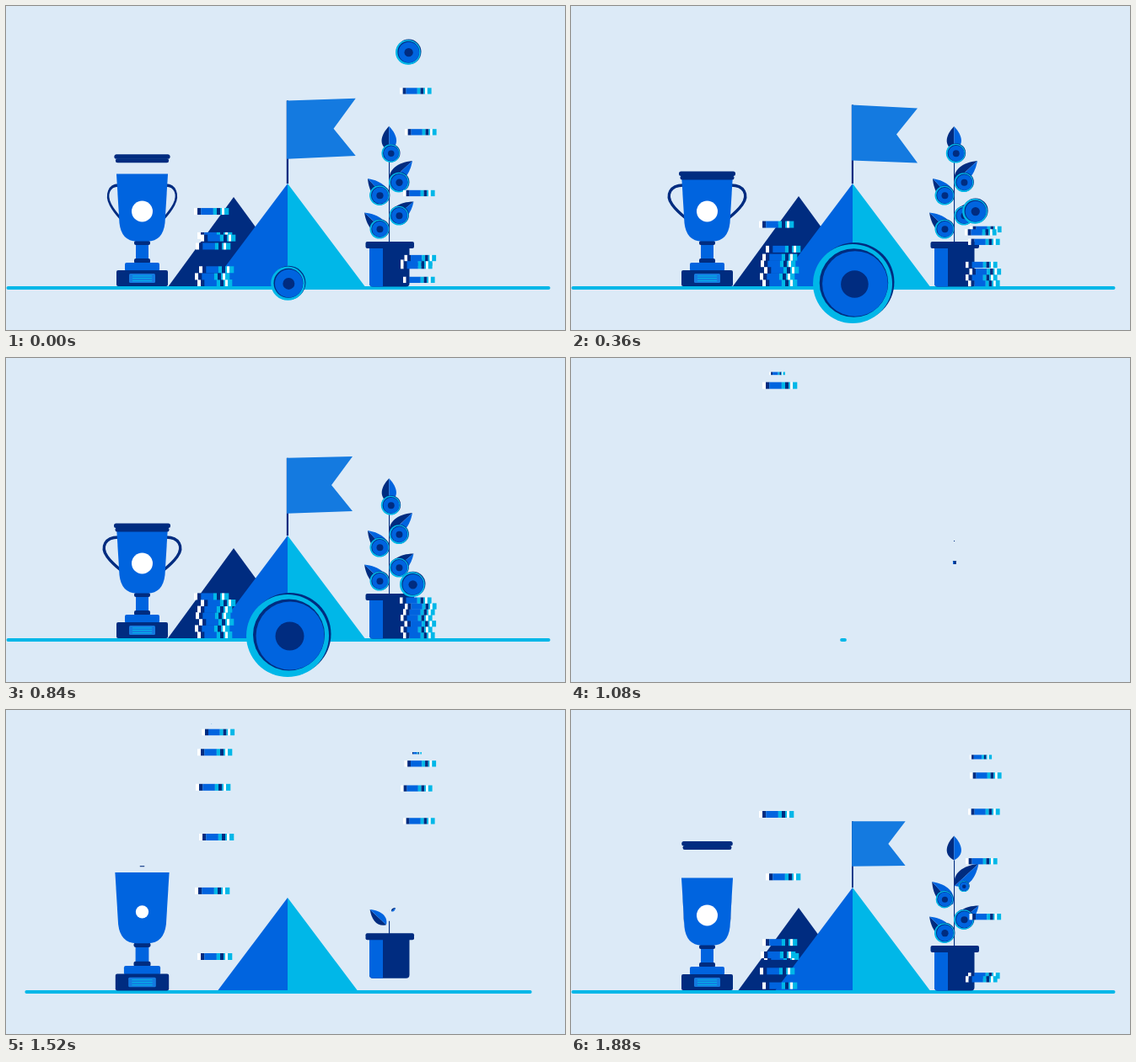
Recreate the animation shown at these times as an HTML page with a canvas. Size 663 px wide and 385 px high, loop 1920 ms.

```html
<!DOCTYPE html>
<html lang="en">
<head>
<meta charset="utf-8">
<title>Goals and savings</title>
<style>
html, body { margin: 0; width: 100%; height: 100%; overflow: hidden; background: #dceaf7; }
canvas { display: block; }
</style>
</head>
<body>
<canvas id="stage" width="663" height="385"></canvas>
<script>
const ctx = document.getElementById('stage').getContext('2d');
const BG = '#dceaf7', BLUE = '#0064df', NAVY = '#002c80', CYAN = '#00b7e8', SKY = '#147ae0', WHITE = '#fff';
const LOOP = 1920, CUT = 1060, RESUME = 2045, GRAVITY = 0.000815;

const clamp = x => Math.min(1, Math.max(0, x));
const easeOut = (v, start, span) => 1 - (1 - clamp((v - start) / span)) ** 3;
function pop(v, start, span = 400) {
  if (v <= start) return 0;
  const x = clamp((v - start) / span) - 1;
  return Math.max(0, 1 + 2.2 * x ** 3 + 1.2 * x * x);
}

// Height of something that falls from y0 to y1 and bounces twice.
function drop(v, start, y0, y1, kick) {
  let t = Math.max(0, v - start);
  const fall = Math.sqrt((y1 - y0) / GRAVITY);
  if (t < fall) return y0 + GRAVITY * t * t;
  t -= fall;
  for (let i = 0; i < 2; i++, kick *= 0.3) {
    const air = kick / GRAVITY;
    if (t < air) return y1 - kick * t + GRAVITY * t * t;
    t -= air;
  }
  return y1;
}

function rect(color, x, y, w, h, r = 0) {
  ctx.fillStyle = color;
  ctx.beginPath();
  ctx.roundRect(x, y, w, h, r);
  ctx.fill();
}
function disc(color, x, y, r) {
  ctx.fillStyle = color;
  ctx.beginPath();
  ctx.arc(x, y, r, 0, 7);
  ctx.fill();
}
function poly(color, ...pts) {
  ctx.fillStyle = color;
  ctx.beginPath();
  for (let i = 0; i < pts.length; i += 2) ctx.lineTo(pts[i], pts[i + 1]);
  ctx.fill();
}
function shape(color, d) {
  ctx.fillStyle = color;
  ctx.fill(new Path2D(d));
}
// Draws with a scale around the point (x, y).
function scaled(x, y, sx, sy, draw) {
  if (sx <= 0 || sy <= 0) return;
  ctx.save();
  ctx.translate(x, y);
  ctx.scale(sx, sy);
  ctx.translate(-x, -y);
  draw();
  ctx.restore();
}

function coin(x, y, r) {
  if (r <= 0) return;
  const k = r / 49.5;
  disc(NAVY, x + 2 * k, y - 1.5 * k, 49 * k);
  disc(CYAN, x - 0.5 * k, y + 0.5 * k, 49 * k);
  disc(NAVY, x + k, y - 0.5 * k, 42.5 * k);
  disc(BLUE, x + 2.5 * k, y + 0.5 * k, 40.5 * k);
  disc(NAVY, x + 2 * k, y + k, 17 * k);
}

const STRIPES = [[WHITE, 4], [NAVY, 4.3], [BLUE, 14.5], [CYAN, 4.2], [NAVY, 4], [CYAN, 2], [WHITE, 3], [CYAN, 5.2]];
function chip(x, y, w, h) {
  const k = w / 41.2;
  for (const [color, span] of STRIPES) {
    rect(color, x, y - h / 2, span * k + 0.1, h);
    x += span * k;
  }
}
function chips(v, pile) {
  pile.starts.forEach((start, i) => {
    const y = drop(v, start, pile.top, pile.base - i * pile.step, 0.225 + 0.018 * i);
    const s = clamp((v - start) / 120), x = pile.xs[i];
    scaled(x + pile.w / 2, y, s, s, () => chip(x, y, pile.w, pile.h));
  });
}
const LEFT = {
  xs: [227, 224, 229, 225, 227, 231, 223], starts: [937, 1026, 1113, 1215, 1315, 1407, 1516],
  top: 16, base: 329, step: 7.6, w: 41.2, h: 8
};
const RIGHT = {
  xs: [471, 468, 472.5, 468, 471, 473, 467], starts: [1203, 1290, 1390, 1481, 1585, 1695, 1795],
  top: 50, base: 329.5, step: 6.9, w: 37.5, h: 7.3
};

function mountains(v) {
  const back = easeOut(v, 1480, 711), front = easeOut(v, 1136, 712);
  scaled(270, 333, back, back, () => poly(NAVY, 192, 333, 270, 226, 348, 333));
  scaled(334, 333, front, front, () => {
    poly(BLUE, 242.5, 333, 334, 211, 334, 333);
    poly(CYAN, 334, 333, 334, 211, 425.5, 333);
  });
}

function flag(v) {
  const phase = (v - RESUME) / 760 * 2 * Math.PI;
  const y = 117 + 3 * Math.sin(phase), end = y + 0.8 - 3.3 * Math.cos(phase);
  const s = pop(v, 1765);
  scaled(334, 211, s, s, () => {
    rect(NAVY, 332.8, y, 2.2, 211 - y);
    poly(SKY, 333, y, 411, end, 386, (y + end) / 2 + 33, 411, end + 65, 333, y + 66);
  });
}

function handle() {
  ctx.strokeStyle = NAVY;
  ctx.lineWidth = 3.4;
  ctx.stroke(new Path2D('M135 213C117 212 112 225 120 236Q125 243 136 252'));
}

function trophy(v) {
  const base = pop(v, 1180, 450), cup = pop(v, 1240, 450), arms = easeOut(v, 1870, 500);
  const mark = pop(v, 1450), lid = easeOut(v, 1500, 700);
  scaled(134, 230, arms, 1, handle);
  scaled(161.5, 0, -1 + 2 * (arms > 0), 1, () => {
    ctx.translate(323, 0);
    ctx.scale(-1, 1);
    scaled(134, 230, arms, 1, handle);
  });
  scaled(161.5, 323.5, cup, cup, () => {
    rect(BLUE, 154, 283, 15, 19);
    rect(NAVY, 152, 279, 19, 5, 2);
    rect(NAVY, 152, 300, 19, 6, 2);
    rect(BLUE, 141, 305, 41, 10, 2);
    shape(BLUE, 'M131 199.5H192L188.5 258Q186 279.5 168 279.5H155Q137 279.5 134.5 258Z');
    if (mark) disc(WHITE, 161.5, 244, 12.5 * mark);
  });
  scaled(161.5, 323.5, base, base, () => rect(NAVY, 131, 314, 61, 19, 2));
  scaled(161.5, 323.5, cup, cup, () => {
    rect(SKY, 146, 318, 31, 11, 1.5);
    for (let i = 0; i < 3; i++) rect(CYAN, 150, 320.3 + i * 2.9, 23, 1);
  });
  const rise = 190 - 29 * easeOut(v, 1500, 380);
  const y = v < 1880 ? rise : Math.min(201.5, 161 + 0.00074 * (v - 1880) ** 2);
  scaled(161.5, y, lid, Math.min(1, lid * 1.3), () => {
    rect(NAVY, 128, y - 5, 67, 5.6, 2.5);
    rect(NAVY, 129.5, y, 64, 5, 2.5);
  });
}

function leaf(x, y, tipX, tipY, s) {
  if (!s) return;
  const len = Math.hypot(tipX - x, tipY - y);
  ctx.save();
  ctx.translate(x, y);
  ctx.rotate(Math.atan2(tipX - x, y - tipY));
  ctx.scale(s, s);
  for (const [color, side] of [[NAVY, -1], [BLUE, 1]]) {
    ctx.fillStyle = color;
    ctx.beginPath();
    ctx.moveTo(0, 0);
    ctx.bezierCurveTo(side * 12, -len * 0.2, side * 11, -len * 0.6, 0, -len);
    ctx.fill();
  }
  ctx.restore();
}

function plant(v) {
  const lift = drop(v, 1099, -63, 0, 0.22), size = clamp((v - 1070) / 130);
  ctx.save();
  ctx.translate(0, lift);
  const stem = 280 - 108 * easeOut(v, 1490, 640);
  rect(NAVY, 454, stem, 1.1, 281 - stem);
  leaf(451, 270, 425, 245.5, pop(v, 1420));
  leaf(457, 254, 483.5, 232.5, pop(v, 1500));
  leaf(453, 231, 429, 205, pop(v, 1570));
  leaf(455, 209, 482, 184, pop(v, 1640));
  leaf(454.3, stem, 454.3, stem - 29, pop(v, 1700));
  coin(443, 265, 11.5 * pop(v, 1590));
  coin(466, 249, 11.5 * pop(v, 1665));
  coin(443, 225, 11.5 * pop(v, 1740));
  coin(466, 209.5, 11.5 * pop(v, 1812));
  coin(456.3, 175, 11.5 * pop(v, 1890));
  scaled(455, 306, size, size, () => {
    rect(NAVY, 431, 284, 47.5, 49.5, 4);
    rect(BLUE, 431, 284, 16, 49.5, [0, 0, 0, 4]);
    rect(NAVY, 426.5, 280, 57.5, 8, 2);
  });
  ctx.restore();
}

function render(now) {
  const t = now % LOOP;
  const v = t < CUT ? t + RESUME : t;
  rect(BG, 0, 0, 663, 385);
  const half = 322.5 * easeOut(v, 1077, 748);
  mountains(v);
  flag(v);
  rect(CYAN, 323 - half, 333, 2 * half, 4, 2);
  trophy(v);
  plant(v);
  chips(v, LEFT);
  chips(v, RIGHT);
  coin(477 + 5 * clamp((v - RESUME) / 840), drop(v, 1688, -49, 269, 0.348), 15);
  const age = v - RESUME + 40;
  if (age > 0) coin(334.5, 329.5, 49.5 * (1 - Math.exp(-0.008 * age) * Math.cos(0.0156 * age)));
}

let begin;
function frame(now) {
  begin ??= now;
  render(now - begin);
  requestAnimationFrame(frame);
}
render(0);
requestAnimationFrame(frame);
</script>
</body>
</html>
```
